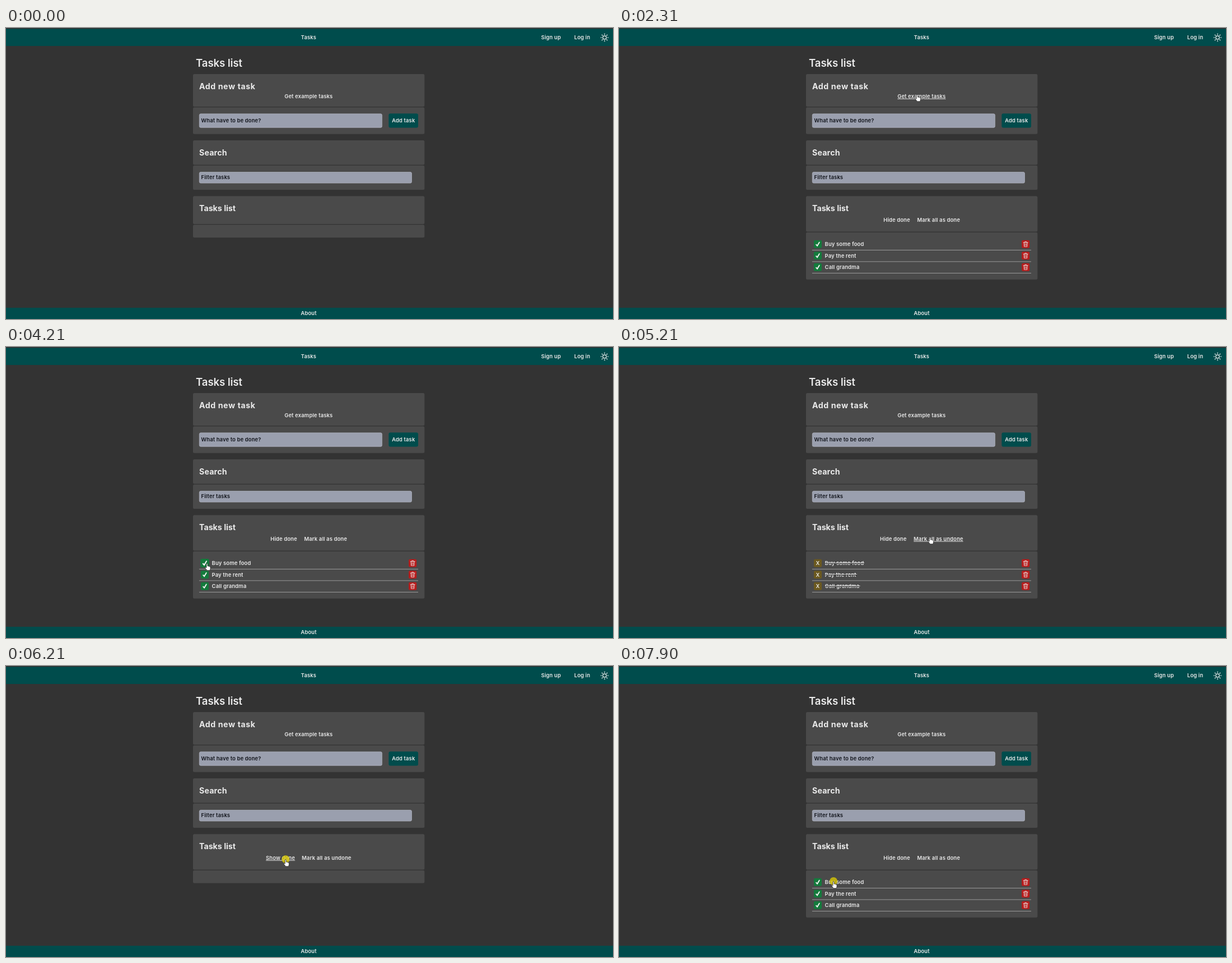
An HTML page for the animation above (8000 ms loop, 1081 px wide and 518 px high).

```html
<!DOCTYPE html>
<html lang="en">
<head>
<meta charset="utf-8">
<title>Tasks</title>
<style>
  html, body { margin: 0; width: 100%; height: 100%; overflow: hidden; background: #333; }
  svg { display: block; }
  text { font: 600 9.4px Inter, "Open Sans", sans-serif; letter-spacing: .15px; fill: #eaeaea; white-space: pre; }
  .h1 { font-size: 18.6px; letter-spacing: -.1px; }
  .h2 { font-size: 14.2px; font-weight: 700; letter-spacing: 0; }
  .wide { letter-spacing: .55px; }
  .mid { text-anchor: middle; }
  .dark { fill: #10131a; }
  .on { text-decoration: underline; }
  .bar { fill: #004c4c; }
  .panel { fill: #4a4a4a; }
  .field { fill: #9a9fae; stroke: #b3b7c2; stroke-width: .7; }
  .icon { fill: none; stroke: #f2f2f2; stroke-linecap: round; }
</style>
</head>
<body>
<svg width="1081" height="518" viewBox="0 0 1081 518">
  <rect class="bar" y="1.5" width="1081" height="30.5"/>
  <rect class="bar" y="498" width="1081" height="20"/>
  <text class="mid" x="539" y="20">Tasks</text>
  <text x="953" y="20" letter-spacing=".2">Sign up</text>
  <text x="1012" y="20">Log in</text>
  <text class="mid" x="539" y="511.3">About</text>
  <g class="icon" id="sun" transform="translate(1066 17)" stroke-width="1.2"><circle r="3.2"/></g>
  <text class="h1" x="338" y="69.3">Tasks list</text>
  <g id="panels"></g>
  <text class="h2 wide" x="344" y="109">Add new task</text>
  <rect class="field" x="344.3" y="152.8" width="325.4" height="24.4" rx="2.5"/>
  <text class="dark" x="347.6" y="168">What have to be done?</text>
  <rect class="bar" x="681.5" y="152.3" width="52.5" height="25.2" rx="3"/>
  <text class="mid" x="707.8" y="168">Add task</text>
  <text class="h2" x="344" y="227" style="letter-spacing:.15px">Search</text>
  <rect class="field" x="344.3" y="256.5" width="378.2" height="19.6" rx="2.5"/>
  <text class="dark" x="347.6" y="269.4">Filter tasks</text>
  <text class="h2" x="344" y="326">Tasks list</text>
  <g id="live"></g>
</svg>
<script>
const $ = id => document.getElementById(id);
const LOOP = 8000;
const TASKS = [['Buy some food', 70], ['Pay the rent', 57], ['Call grandma', 62.5]];

// pointer stops: time, x, y
const PATH = [
  [200, 975, 481], [900, 531, 118], [2410, 531, 118], [3110, 357, 392], [3310, 356, 416],
  [3610, 358, 385], [4310, 358, 385], [4510, 365, 416], [4910, 554, 338], [5210, 554, 338],
  [5710, 498, 344], [6410, 498, 344], [6610, 545, 342], [7010, 545, 342], [7710, 371, 385],
  [7810, 382, 383]
];
const CLICKS = [[1200, 1400], [3710, 3910], [4110, 4210], [5010, 5210],
  [5910, 6010], [6210, 6310], [6910, 7010], [7900, 8000]];
const HAND = 'M-1 1Q0-.7 1 1V5Q2.2 4.3 2.8 5.4Q4 4.8 4.5 5.9Q5.8 5.5 6 7V9.5Q5.8 11 5 12.7H0L-3 8.6Q-3.6 7-2.2 7L-1 8Z';
const ARROW = 'M0 0V11.5L2.6 9.1L4.4 13L6 12.3L4.3 8.5H8Z';

const within = (t, a, b) => t >= a && t < b;
const panel = (top, bottom) =>
  `<rect class="panel" x="333" y="${top}" width="412.3" height="${bottom - top}" rx="2.5"/>`;

$('panels').innerHTML = panel(82, 140) + panel(141.2, 188.7) + panel(200, 243.5) + panel(244.8, 288);
for (let a = 0; a < 360; a += 45)
  $('sun').innerHTML += `<path d="M0-5.3V-6.8" transform="rotate(${a})"/>`;

function pointer(t) {
  // the pointer is sampled ten times a second
  const shift = t > 2000 ? 10 : 0;
  t = Math.floor((t - shift) / 100) * 100 + shift;
  const i = PATH.findIndex(p => p[0] > t);
  if (i < 0) return PATH[PATH.length - 1].slice(1);
  const [t0, x0, y0] = PATH[i - 1], [t1, x1, y1] = PATH[i];
  const k = (t - t0) / (t1 - t0), e = k * k * (3 - 2 * k);
  return [x0 + (x1 - x0) * e, y0 + (y1 - y0) * e];
}

function scene(t) {
  const seen = t >= 200;
  const [px, py] = seen ? pointer(t) : [-99, -99];
  const filled = t >= 2310, hidden = within(t, 6010, 6310), allDone = within(t, 5210, 7010);
  let hand = false;

  const over = (x, y, w, h) => {
    const hit = px >= x && px <= x + w && py >= y && py <= y + h;
    hand ||= hit;
    return hit;
  };
  const link = (label, x, y, w) =>
    `<text class="${over(x, y - 10, w, 14) ? 'on' : ''}" x="${x}" y="${y}">${label}</text>`;

  const row = ([label, w], i) => {
    const y = 384.8 + i * 20.5;
    const done = allDone || (i === 0 && within(t, 3810, 4210));
    const scale = over(347, y - 7, 14, 14) ? 1.1 : 1;
    over(366, y - 6, w, 12);
    const mark = done
      ? '<text class="mid" y="3.5">X</text>'
      : '<path class="icon" d="M-2.8.8L-.9 2.9L2.8-3.2" stroke-width="1.9"/>';
    const strike = done
      ? `<path d="M367 ${y - .4}h${w}" stroke="#eaeaea"/><path d="M367 ${y + .6}h${w}" stroke="#2b2b2b"/>` : '';
    return `<g transform="translate(354 ${y}) scale(${scale})">
        <rect x="-7" y="-7" width="14" height="14" rx="2" fill="${done ? '#6b5920' : '#147a3c'}"/>${mark}</g>
      <text x="366.6" y="${y + 3.2}">${label}</text>${strike}
      <g transform="translate(724.2 ${y})">
        <rect x="-7" y="-7" width="14" height="14" rx="2" fill="#b71c1c"/>
        <path class="icon" d="M-4-3H4M-1.4-3V-4.4H1.4V-3M-3.1-3L-2.6 4.3H2.6L3.1-3M-1.1-1V2.5M1.1-1V2.5" stroke-width=".8"/></g>
      <path d="M344 ${y + 10.6}H734" stroke="#a4a4a4" stroke-width=".9"/>`;
  };

  let out = within(t, 1400, 2310)
    ? link('Loading...', 516.8, 124.7, 44.5)
    : link('Get example tasks', 496, 124.7, 86);

  if (!filled) out += panelPair(349, 350.3, 373);
  else {
    out += panelPair(362.5, 363.8, hidden ? 386.5 : 447.7);
    const [x1, x2] = hidden ? [462.8, 526.8] : allDone ? [464.8, 524.8] : [471, 531];
    out += link(hidden ? 'Show done' : 'Hide done', x1, 344.6, hidden ? 52.5 : 48.5);
    out += link(allDone ? 'Mark all as undone' : 'Mark all as done', x2, 344.6, allDone ? 88.5 : 76);
    if (!hidden) out += TASKS.map(row).join('');
  }

  if (seen) {
    const at = `transform="translate(${px.toFixed(1)} ${py.toFixed(1)})"`;
    if (CLICKS.some(([a, b]) => within(t, a, b)))
      out += `<circle r="7" ${at} fill="#e2d000" opacity=".75"/>`;
    out += `<path d="${hand ? HAND : ARROW}" ${at} fill="#fff" stroke="#222" stroke-width=".7"/>`;
  }
  return out;
}

// the list heading stays above its growing body
function panelPair(headEnd, bodyTop, bodyEnd) {
  const title = '<text class="h2" x="344" y="326">Tasks list</text>';
  return panel(299.2, headEnd) + panel(bodyTop, bodyEnd) + title;
}

let last = '';
const start = performance.now();
function draw() {
  const next = scene((performance.now() - start) % LOOP);
  if (next !== last) $('live').innerHTML = last = next;
  requestAnimationFrame(draw);
}
draw();
</script>
</body>
</html>
```
